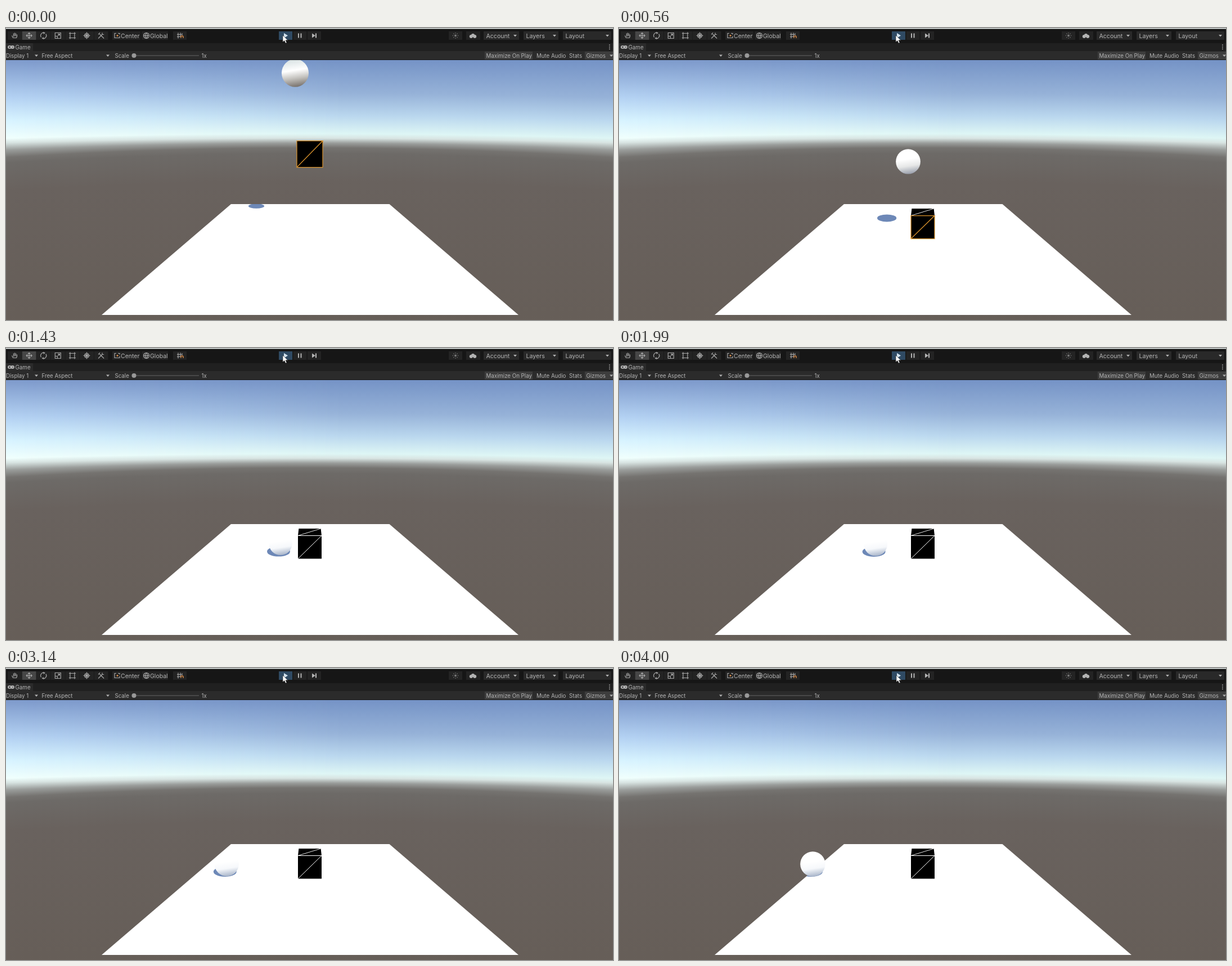
Recreate the animation shown at these times as an HTML page with a canvas. Size 1079x519 px, loop 4.13 s.

```html
<!DOCTYPE html>
<html lang="en">
<head>
<meta charset="utf-8">
<title>Falling ball and cube</title>
<style>
  html, body { margin: 0; width: 100%; height: 100%; overflow: hidden; background: #665e58; }
  canvas { display: block; }
</style>
</head>
<body>
<canvas id="stage" width="1079" height="519"></canvas>
<script>
const W = 1079, H = 519, LOOP = 4130, STEPS = 29, VIEW_TOP = 57;
const stage = document.getElementById('stage').getContext('2d');
const backdrop = document.createElement('canvas');
backdrop.width = W;
backdrop.height = H;
let c = backdrop.getContext('2d');

const lerp = (a, b, k) => a + (b - a) * k;
const clamp = v => Math.min(1, Math.max(0, v));
const mix = (p, q, k) => `rgb(${p.map((v, i) => Math.round(lerp(v, q[i], k)))})`;

// ---- drawing helpers -------------------------------------------------
const LIGHT = '#b4b4b4', BUTTON = '#232323', ORANGE = '#d88b49';

function rect(x, y, w, h, color) {
  c.fillStyle = color;
  c.fillRect(x, y, w, h);
}
function trace(points) {
  c.beginPath();
  points.forEach(p => c.lineTo(...p));
  c.closePath();
}
function poly(points, color) {
  trace(points);
  c.fillStyle = color;
  c.fill();
}
function ellipse(x, y, rx, ry, color) {
  c.beginPath();
  c.ellipse(x, y, rx, ry, 0, 0, 7);
  c.fillStyle = color;
  c.fill();
}
function stroke(path, color = LIGHT, width = 1) {
  c.strokeStyle = color;
  c.lineWidth = width;
  c.stroke(new Path2D(path));
}
function icon(x, path) {
  c.save();
  c.translate(x, 13.5);
  stroke(path, '#a6a6a6', 1.2);
  c.restore();
}
function text(s, x, y, size) {
  c.font = `${size}px Inter, sans-serif`;
  c.fillStyle = LIGHT;
  c.fillText(s, x, y);
}
const button = (x, w, color = BUTTON) => rect(x, 6, w, 15, color);
const arrow = (x, y) => poly([[x - 3, y - 1.5], [x + 3, y - 1.5], [x, y + 2]], LIGHT);

// ---- static scene ----------------------------------------------------
const PLANE = [[400, 313], [681.5, 313], [911, 510], [170, 510]];

function drawSky() {
  // Height above the bright band's lower edge, colour at the left, colour from the middle on.
  const sky = [
    [145, [127, 155, 204], [117, 147, 198]],
    [80, [180, 210, 243], [150, 178, 216]],
    [40, [215, 243, 255], [186, 215, 238]],
    [8, [240, 255, 253], [222, 246, 245]]
  ];
  for (let x = 0; x < W; x++) {
    const bend = (x / W * 2 - 1) ** 2;
    const bright = 196 + 8 * bend, ground = 213 + 17 * bend;
    const g = c.createLinearGradient(0, VIEW_TOP, 0, H);
    const stop = (y, color) => g.addColorStop(clamp((y - VIEW_TOP) / (H - VIEW_TOP)), color);
    sky.forEach(([up, left, right]) => stop(bright - up, mix(left, right, clamp(x / 600))));
    stop(bright, '#d8e4e2');
    stop(lerp(bright, ground, .5), '#9a9d9b');
    stop(ground, '#757370');
    stop(ground + 10, '#6d6a67');
    stop(ground + 60, '#69625e');
    stop(H, '#665e58');
    rect(x, VIEW_TOP, 1, H - VIEW_TOP, g);
  }
}

function drawToolbar() {
  rect(0, 0, W, 27, '#161616');
  rect(0, 0, W, 1.5, '#e9efee');

  [
    'M-3 4L-5 0M-2 2V-4M0 1V-5M2 1V-4M4 2V-2M-3 4H3L4 1',
    'M-5 0H5M0-5V5M-3-2L-5 0L-3 2M3-2L5 0L3 2M-2-3L0-5L2-3M-2 3L0 5L2 3',
    'M-4 3A5 5 0 0 1 1-5M4-3A5 5 0 0 1-1 5M-1-6L2-5L0-3M1 6L-2 5L0 3',
    'M-5-5H5V5H-5ZM-5 1H-1V5M0 0L3-3M0-3H3V0',
    'M-4-4H4V4H-4ZM-6-4H-3M-4-6V-3M3-4H6M4-6V-3M-6 4H-3M-4 3V6M3 4H6M4 3V6',
    'M-4 0A4 4 0 0 1 4 0A4 4 0 0 1-4 0M-6 0H6M0-6V6M-3-3L3 3M3-3L-3 3',
    'M-4-4L5 5M-5-2L-2-5M-5 5L2-2M2-5V-2H5'
  ].forEach((path, i) => {
    button(3 + i * 25.6, 25, i === 1 ? '#464646' : BUTTON);
    icon(15.5 + i * 25.6, path);
  });

  button(189, 50);
  button(241, 47);
  button(297, 24);
  icon(198, 'M-2-4H-5V4H4V1M1-4H4V-2');
  ellipse(198, 13.5, 1.5, 1.5, ORANGE);
  icon(249.5, 'M-5 0A5 5 0 0 1 5 0A5 5 0 0 1-5 0M-5 0H5M0-5Q-4 0 0 5Q4 0 0-5');
  icon(309, 'M-5-2H4M-5 2H1M-3-5V5M1-5V2M4-4V-1');
  stroke('M311 18V15Q313 13 315 15V18', ORANGE, 1.4);
  text('Center', 204, 17.5, 10.5);
  text('Global', 256, 17.5, 10.5);

  for (let i = 0; i < 3; i++) button(485 + i * 25.5, 24, i ? BUTTON : '#2f4a63');
  poly([[494, 9], [501, 13.5], [494, 18]], '#d2e2ee');
  poly([[544, 9.5], [550, 13.5], [544, 17.5]], LIGHT);
  for (const x of [519, 523.5, 550]) rect(x, 9.5, 2, 8, LIGHT);

  button(787, 24);
  button(818, 25);
  ellipse(799, 13.5, 2, 2, '#777');
  for (let a = 0; a < 8; a++) ellipse(799 + 4.5 * Math.cos(a * Math.PI / 4), 13.5 + 4.5 * Math.sin(a * Math.PI / 4), .8, .8, '#777');
  for (let i = -1; i < 2; i++) ellipse(830 + i * 3.2, 15 - 2 * (i === 0), 3, 3, LIGHT);

  for (const [label, x, w] of [['Account', 849, 63], ['Layers', 920, 62], ['Layout', 990, 86]]) {
    button(x, w, '#292929');
    text(label, x + 4.5, 17.5, 10.6);
    arrow(x + w - 7, 13.5);
  }
}

function drawGameBar() {
  rect(0, 27, W, 14, '#202020');
  rect(0, 27, 48, 14, '#2b2b2b');
  rect(0, 41, W, 15, '#2b2b2b');
  rect(0, 56, W, 1, '#191919');
  rect(851, 42, 85, 14, '#3d3d3d');
  rect(1029, 42, 50, 14, '#3d3d3d');

  ellipse(6.5, 34, 3.5, 3, LIGHT);
  ellipse(11.5, 34, 3.5, 3, LIGHT);
  stroke('M5 34H8M6.5 32.5V35.5M11 34H13', '#2b2b2b');
  text('Game', 16.5, 37.5, 9.8);
  for (let i = 0; i < 3; i++) rect(1072, 29.5 + i * 3.5, 1.6, 1.6, LIGHT);

  const labels = {
    'Display 1': 0, 'Free Aspect': 63.5, 'Scale': 193.5, '1x': 347.5,
    'Maximize On Play': 853.5, 'Mute Audio': 943, 'Stats': 1001, 'Gizmos': 1031.5
  };
  for (const label in labels) text(label, labels[label], 52.5, 9.7);
  for (const x of [54, 181, 1076]) arrow(x, 49);
  rect(228, 48.5, 115, 1, '#666');
  ellipse(227.5, 49, 4, 4, '#999');
}

// ---- motion (t in seconds) -------------------------------------------
const REST_Y = 348.5, CUBE_TOP_Y = 307, LAND = .7;

// The ball drops onto the cube, slips off its edge, then rolls left at a steady speed.
function ballAt(t) {
  const x = 514 - 56 * Math.max(0, t - .96);
  const falling = Math.min(CUBE_TOP_Y, 80 + 175 * t + 178 * t * t);
  const y = Math.min(REST_Y, falling + 146 * Math.max(0, t - .9) ** 2);
  const r = lerp(24, 20.8, clamp(t / .84)) + 3.8e-5 * (x - 540) ** 2;
  return { x, y, rx: r, ry: r + .8 * clamp(1 - t / .84) };
}

function drawShadow({ x, y }) {
  const height = REST_Y - y;
  const lift = height * (.25 - .0003 * height);
  c.save();
  trace(PLANE);
  c.clip();
  ellipse(x - 3 - 1.45 * lift, 362 - lift, 20.5 - .14 * lift, 9 - .104 * lift, '#6d88b7');
  c.restore();
}

function drawCube(t) {
  const bottom = Math.round(Math.min(375, 248 + 173 * t + 96 * t * t)) - .5;
  const k = (bottom - 247.5) / 127;
  const top = bottom - Math.round(lerp(47, 40.5, k));
  const back = top - 12.5 * k, w = lerp(23, 21, k), bw = w - 1.4 * k;
  const l = 540 - w, r = 540 + w;
  poly([[l, bottom], [r, bottom], [r, top], [540 + bw, back], [540 - bw, back], [l, top]], '#000');
  stroke(`M${l} ${top}L${540 + bw} ${back}`, '#e4e4e4');
  const edges = `M${l} ${bottom}L${r} ${top}H${l}`;
  if (t < LAND) stroke(`${edges}V${bottom}H${r}V${top}`, '#d9922c', 1.25);
  else stroke(edges, '#fff');
}

function drawBall(t, { x, y, rx, ry }) {
  const k = clamp(t / .84);
  c.save();
  c.beginPath();
  c.rect(0, VIEW_TOP, W, H);
  c.clip();
  c.translate(x, y);
  c.scale(rx, ry);
  const g = c.createLinearGradient(-.15, -1, .15, 1);
  g.addColorStop(0, mix([215, 225, 226], [255, 255, 255], clamp(k * 3)));
  g.addColorStop(.4, '#fff');
  g.addColorStop(.68, mix([196, 194, 190], [246, 248, 251], k));
  g.addColorStop(1, mix([118, 112, 107], [166, 179, 200], k));
  ellipse(0, 0, 1, 1, g);
  c.restore();
}

function drawCursor(t) {
  const shape = 'M0 0V12L2.8 9.4L5 14L7 13L5 8.8H9Z';
  c.save();
  c.translate(t < 3.8 ? 492 : 493, 13);
  c.fillStyle = '#fff';
  c.fill(new Path2D(shape));
  stroke(shape, '#222', .6);
  c.restore();
}

drawSky();
poly(PLANE, '#fff');
drawToolbar();
drawGameBar();
c = stage;

const start = performance.now();

function render() {
  const step = LOOP / STEPS;
  const now = (performance.now() - start) % LOOP;
  const t = Math.min(STEPS - 1, Math.floor((now + 18) / step)) * step / 1000;
  const ball = ballAt(t);
  c.drawImage(backdrop, 0, 0);
  drawShadow(ball);
  drawCube(t);
  drawBall(t, ball);
  drawCursor(t);
  requestAnimationFrame(render);
}
render();
</script>
</body>
</html>
```
